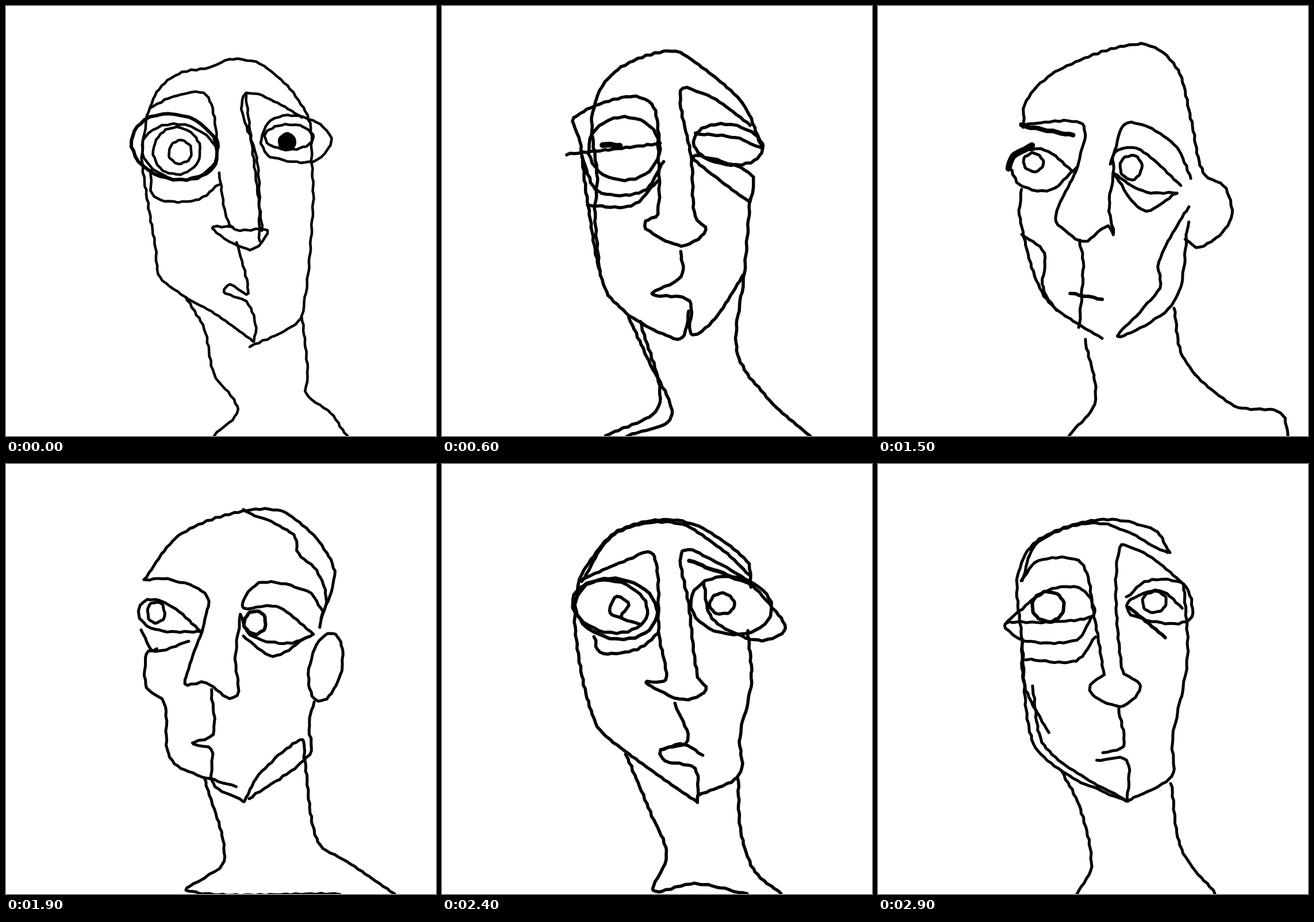
An HTML page with a canvas that plays this animation: 748 px wide and 748 px high, repeating every 3000 ms.

```html
<!DOCTYPE html>
<html lang="en">
<head>
<meta charset="utf-8">
<title>Turning head</title>
<style>
html, body { margin: 0; height: 100%; overflow: hidden; background: #fff; }
canvas { display: block; }
</style>
</head>
<body>
<canvas id="stage" width="748" height="748"></canvas>
<script>
const ctx = document.getElementById('stage').getContext('2d');
let pen = 5;

// Small unevenness of the hand, fixed to the place on the paper.
function touch(x, y) {
  ctx.lineTo(x + Math.sin(x * 0.4 + y * 0.23), y + Math.sin(y * 0.37 - x * 0.29));
}

// Tangent at b: long on a straight run, short at a sharp corner.
function tangent(a, b, c) {
  const span = Math.hypot(b[0] - a[0], b[1] - a[1]) + Math.hypot(c[0] - b[0], c[1] - b[1]);
  return [(c[0] - a[0]) / span, (c[1] - a[1]) / span];
}

function line(text, width = pen) {
  const p = text.split(' ').map(pair => pair.split(',').map(Number));
  ctx.lineWidth = width;
  ctx.beginPath();
  for (let i = 1; i < p.length; i++) {
    const a = p[i - 1], b = p[i];
    const length = Math.hypot(b[0] - a[0], b[1] - a[1]);
    const out = tangent(p[i - 2] || a, a, b), into = tangent(a, b, p[i + 1] || b);
    const steps = Math.ceil(length / 8);
    for (let k = 0; k <= steps; k++) {
      const t = k / steps, s = 1 - t;
      const at = n => a[n] * s * s * (s + 3 * t) + b[n] * t * t * (t + 3 * s)
        + length * s * t * (s * out[n] - t * into[n]);
      touch(at(0), at(1));
    }
  }
  ctx.stroke();
}

function oval(x, y, rx, ry, tilt = 0, width = pen) {
  ctx.lineWidth = width;
  ctx.beginPath();
  for (let k = 0; k <= 40; k++) {
    const u = rx * Math.cos(k * Math.PI / 20), v = ry * Math.sin(k * Math.PI / 20);
    touch(x + u * Math.cos(tilt) - v * Math.sin(tilt), y + u * Math.sin(tilt) + v * Math.cos(tilt));
  }
  ctx.stroke();
}

function startled() {
  pen = 4.5;
  line('312,506 268,472 260,420 241,305 237,250 258,156 300,118 354,107 395,92 455,108 524,190 532,275 534,350 515,537 490,562 425,592');
  line('312,506 357,532 430,583');
  line('312,506 345,562 362,640 403,702 361,748');
  line('515,541 525,637 523,676 565,709 593,748');
  line('250,178 290,158 348,154 370,245');
  oval(293, 245, 76, 56, 0.25, 6);
  oval(302, 254, 66, 48, 0.2);
  oval(297, 252, 41, 41);
  oval(303, 254, 20, 20);
  line('252,285 258,332 330,338 371,310');
  line('370,290 393,385 454,390 425,424 359,386 394,384');
  line('441,410 437,270 410,180 417,152 460,162 515,195');
  line('417,155 446,390');
  line('443,240 455,204 490,190 540,202 567,235 535,270 460,262 443,240');
  oval(492, 228, 42, 22);
  oval(488, 236, 8, 8, 0, 16);
  line('402,412 421,500 390,484 378,498 418,514 434,553 432,583');
}

function blinking() {
  pen = 5.5;
  line('274,460 266,360 270,300 262,185 300,115 393,78 440,97 523,170 557,247');
  line('325,540 283,490 253,340 240,235 230,195 320,158 365,170 379,240');
  line('536,335 526,465 513,600 560,675 640,748');
  oval(317, 248, 62, 55);
  line('216,258 290,250 380,239');
  line('280,241 310,243', 10);
  line('243,262 272,322 350,322 385,270');
  line('254,347 330,347 375,305');
  line('376,230 375,362 353,375 355,387 417,417 459,390 440,365 434,268 416,146 470,160 537,207');
  oval(498, 241, 61, 35, 0.15);
  line('440,222 510,229 558,248');
  line('536,340 541,298 505,276 436,262 505,320 536,340');
  line('415,427 417,470 366,501 430,512 433,571 465,555 526,465');
  line('325,540 415,579 430,530');
  line('325,542 356,610 399,715 322,748');
  line('345,548 377,695 285,748');
}

function turned() {
  pen = 5;
  line('241,202 300,125 412,82 492,88 570,180 549,268');
  line('412,80 500,122 509,157 540,185 557,232 545,285');
  line('241,202 280,200 349,228 340,292 312,382 348,380 390,408 404,396 399,340 408,262');
  line('340,292 290,248 245,236 230,262 260,288 340,292');
  oval(261, 258, 15, 18);
  line('235,288 258,325 318,308');
  line('262,322 245,330 245,390 275,415 289,516 400,562');
  line('535,297 470,248 411,250 440,207 525,222 552,258');
  line('408,262 425,298 490,312 535,297');
  oval(433, 276, 19, 20, 0, 6);
  line('412,300 465,334 525,300');
  oval(556, 353, 28, 60, 0.2);
  line('535,415 527,455 528,505 422,583');
  line('415,587 445,535 515,479 519,510');
  line('357,393 360,470 324,486 357,497 360,555 413,587');
  line('345,545 379,690 315,742 580,748');
  line('519,510 543,658 600,695 675,748');
}

function weary() {
  pen = 5;
  line('253,212 258,165 315,111 458,66 518,105 544,195 566,290 605,318 613,375 560,420 535,405');
  line('247,206 355,206 346,280 308,370 325,390 358,410 400,382 410,398 402,350 410,290');
  line('250,208 340,225', 8);
  line('228,282 235,262 268,243', 11);
  line('235,255 290,250 337,285');
  line('232,285 247,312 300,320 346,280');
  oval(270, 272, 17, 16);
  line('250,318 247,370 293,510 390,578');
  line('250,398 289,430 287,490 310,530');
  line('405,275 428,207 455,205 515,240 545,300');
  line('410,290 412,255 450,248 527,312');
  line('410,290 460,322 520,325');
  oval(440, 281, 19, 21);
  line('410,292 462,356 520,325');
  line('540,350 528,368 488,445 490,490 417,575 515,515 540,375');
  line('350,408 357,445 350,560');
  line('335,500 390,510', 6);
  line('360,580 378,685 333,748');
  line('515,525 533,615 620,695 700,707 714,748');
}

function dazed() {
  pen = 5.5;
  line('445,588 318,500 267,450 232,290 240,200 265,160 300,120 370,98 440,106 530,168 537,215');
  line('243,205 300,122 405,102 490,150 535,195');
  oval(303, 252, 72, 52, 0.2, 6);
  oval(292, 248, 66, 45, 0.2);
  line('345,280 312,265 326,245 305,230 292,260 315,268');
  line('245,200 315,170 367,156 378,300 389,375 355,380 420,410 460,393 445,370 430,250 420,150 535,203');
  line('265,300 275,328 340,322 375,295');
  line('430,168 540,210', 7);
  oval(503, 246, 71, 50, 0.15);
  line('455,205 470,268 550,307 597,285 535,205');
  oval(487, 243, 21, 18);
  line('532,290 538,380 518,475 518,540 445,577');
  line('405,417 428,482 380,498 388,516 440,530 445,588');
  line('380,498 420,487 453,507');
  line('320,505 362,605 391,680 367,742 440,730 530,748');
  line('515,545 520,640 545,710 590,748');
}

function calm() {
  pen = 5;
  line('432,587 320,535 268,480 250,300 243,195 275,135 385,97 480,115 508,155');
  line('250,202 280,135 385,103 505,155');
  line('248,203 280,168 353,172 376,265 393,366');
  line('220,278 295,220 355,218 375,262 300,275 220,278 250,306 345,306 370,268');
  oval(296, 248, 28, 26, 0, 6);
  line('258,340 345,342 378,300');
  line('250,300 255,385 297,468');
  line('268,385 293,495 432,587');
  line('393,366 370,385 372,400 420,422 447,405 455,382 425,360 420,145 470,160 532,210');
  line('432,232 470,203 532,210 546,265 515,278 440,262 435,240 490,220 530,250');
  oval(481, 240, 21, 18);
  line('437,250 500,303', 6);
  line('532,210 538,340 512,480 510,543 432,587');
  line('418,425 427,490 390,503');
  line('380,516 432,515 434,587');
  line('320,535 352,600 371,700 345,748');
  line('510,555 528,670 587,748');
}

// Redrawn variants: the same strokes, slightly stretched.
function calmWide() {
  ctx.transform(1.08, 0, 0, 1.02, -37, -15);
  calm();
}

function turnedWide() {
  ctx.transform(1.03, 0, 0, 1.02, -11, -13);
  turned();
}

const frontal = [startled, calmWide, dazed, calm];
const sideways = [weary, turned, turnedWide];

function poseAt(step) {
  if (step === 6 || step === 23) return blinking;
  if (step > 6 && step < 23) return sideways[step % 3];
  return frontal[(step + (step > 23 ? 2 : 0)) % 4];
}

function draw() {
  ctx.setTransform(1, 0, 0, 1, 0, 0);
  ctx.fillStyle = '#fff';
  ctx.fillRect(0, 0, 748, 748);
  ctx.lineCap = ctx.lineJoin = 'round';
  poseAt(Math.floor(performance.now() % 3000 / 100))();
  requestAnimationFrame(draw);
}
draw();
</script>
</body>
</html>
```
